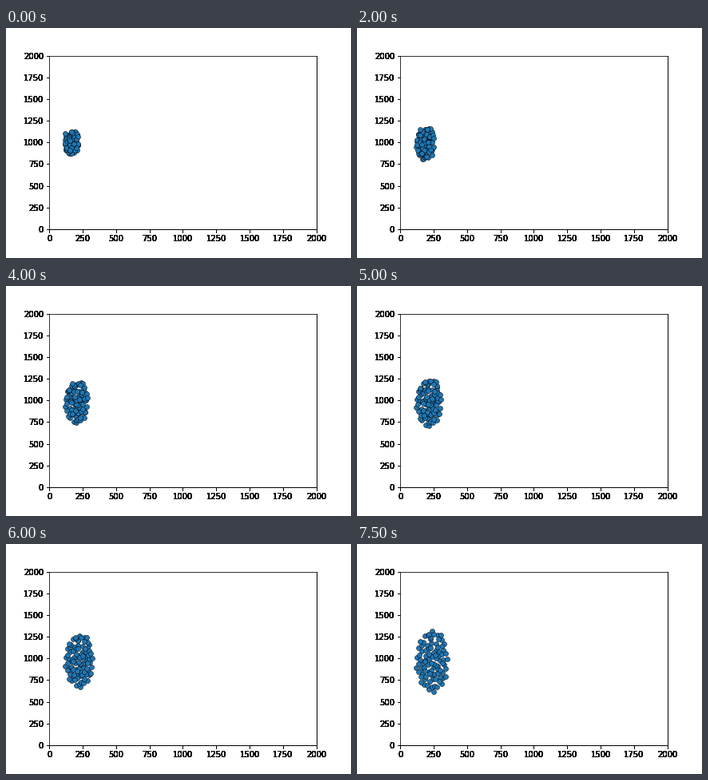
Animation of 432x288 px, one loop 8 s. Source, as a matplotlib script:

```python
import numpy as np
import matplotlib.pyplot as plt
from matplotlib.animation import FuncAnimation

STEPS = 16
COUNT = 92
LAYERS = 14

rng = np.random.default_rng(11)

# Even spread over a unit disc: golden-angle spiral with some jitter
index = np.arange(COUNT)
radius = ((index + .5) / COUNT) ** .54
angle = index * np.pi * (3 - np.sqrt(5)) + 1
disc = np.column_stack([radius * np.cos(angle), radius * np.sin(angle)])
disc += rng.normal(0, .06, disc.shape) * (1 - radius[:, None] ** 4)

# The packed cloud is squarer and loosely follows the same layout
packed = np.clip(disc * 1.1 + rng.normal(0, .28, disc.shape), -1, 1)

# Cloud centre and half size in data units
first = (167, 996) + packed * (47, 123)
last = (237, 972) + disc * (119, 364)

order = rng.permutation(COUNT)
first, last = first[order], last[order]

plt.rcParams.update({"font.family": "DejaVu Sans", "font.size": 10})
fig = plt.figure(figsize=(6, 4), dpi=72, facecolor="white")

# Stacked axes harden the antialiased labels and the outer lines
ticks = range(0, 2001, 250)
for layer in range(LAYERS):
    ax = fig.add_axes([.125, .125, .775, .755], label=f"layer{layer}")
    ax.set(xlim=(0, 2000), ylim=(0, 2000), xticks=ticks, yticks=ticks)

dots = ax.scatter(*first.T, s=36, c="#1f77b4", edgecolors="black", linewidths=.5)


def draw(step):
    dots.set_offsets(first + (last - first) * step / (STEPS - 1))
    return dots,


anim = FuncAnimation(fig, draw, frames=STEPS, interval=500, repeat=True,
                     repeat_delay=0, blit=False)
plt.show()
```
